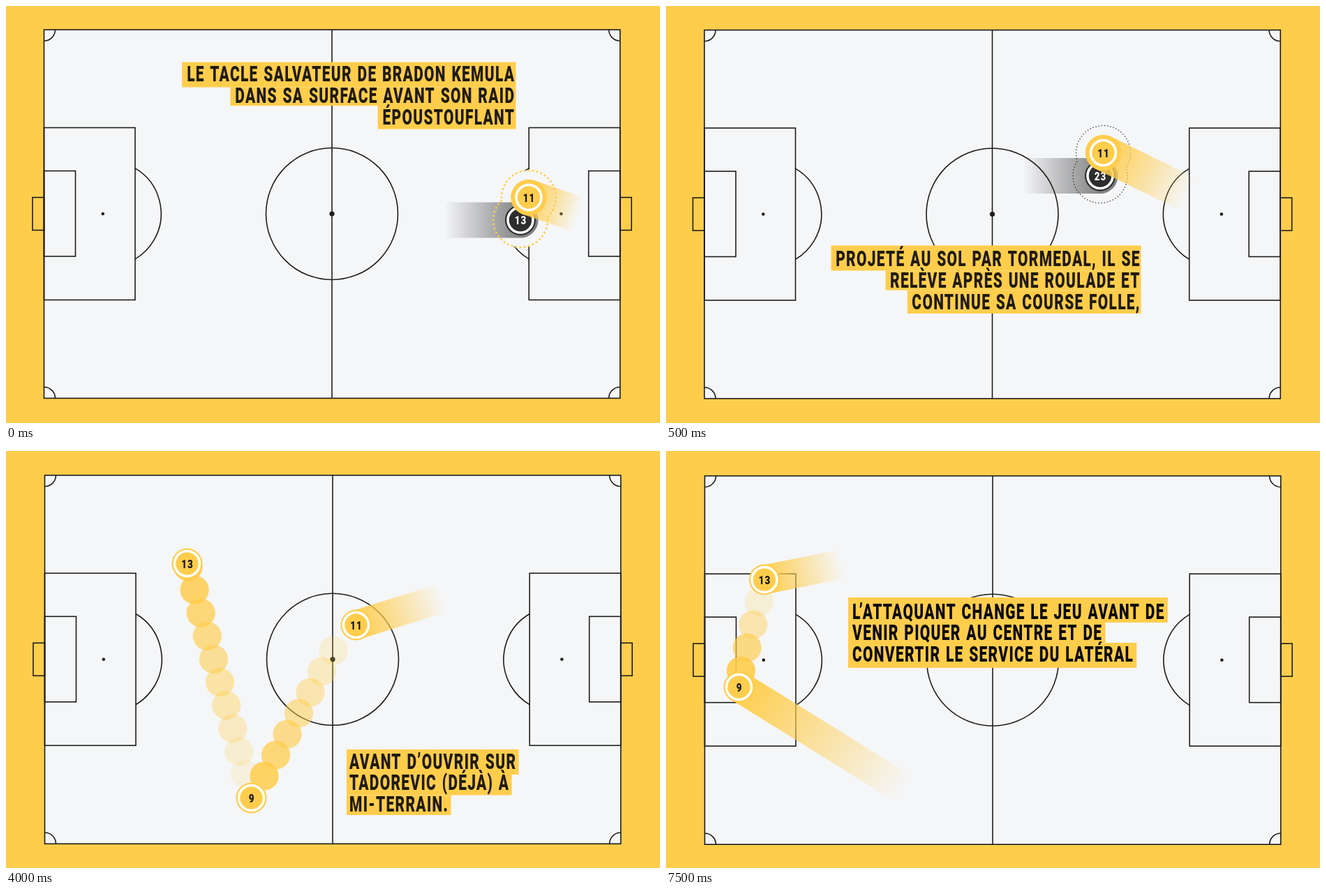
An HTML page with a canvas for the animation above (8000 ms loop, 937x598 px).

```html
<!DOCTYPE html>
<html lang="fr">
<head>
<meta charset="utf-8">
<title>Action de jeu</title>
<style>
  html, body { margin: 0; width: 100%; height: 100%; overflow: hidden; background: #ffcd4c; }
  canvas { display: block; width: 937px; height: 598px; }
</style>
</head>
<body>
<canvas id="stage"></canvas>
<script>
const W = 937, H = 598, LOOP = 8000;
const YELLOW = '#ffcd4c', PITCH = '#f5f6f8', INK = '#1d1d1b', DARK = '#2d2d2d';
const RGB = { yellow: '255,205,76', grey: '45,45,45' };
const TAU = Math.PI * 2;
const TRACKING = 2;

const canvas = document.getElementById('stage');
const ctx = canvas.getContext('2d');
const dpr = window.devicePixelRatio || 1;
canvas.width = W * dpr;
canvas.height = H * dpr;

const scenes = [
  {
    start: 0, shift: [0, 0],
    draw() {
      duel([749, 274.5], [820, 299], [737, 307], [628, 307], '13', YELLOW, 1.5, 6.2);
    },
    caption: {
      lines: ['LE TACLE SALVATEUR DE BRADON KEMULA', 'DANS SA SURFACE AVANT SON RAID', 'ÉPOUSTOUFLANT'],
      align: 'right', x: 728, pad: [7, 2.5], tops: [80.5, 116.5, 143, 176.5], base: 108, ink: '#201b0f'
    }
  },
  {
    start: 500, shift: [0.5, 0.5],
    draw() {
      duel([626.5, 210.5], [748, 270], [622, 243.5], [511, 243.5], '23', INK, 0.75, 4.2);
    },
    caption: {
      lines: ['PROJETÉ AU SOL PAR TORMEDAL, IL SE', 'RELÈVE APRÈS UNE ROULADE ET', 'CONTINUE SA COURSE FOLLE,'],
      align: 'right', x: 678.5, pad: [6.5, 2], tops: [343.5, 379.5, 407.5, 441], base: 373, ink: '#201b0f'
    }
  },
  {
    start: 4000, shift: [1, 0.8],
    draw() {
      passes([261, 166], [343, 464], 10, 0.92, 0.14);
      passes([370, 466], [469, 286], 7, 0.85, 0.2);
      trail([501.5, 249.5], [626, 210.5], 21, RGB.yellow, 1);
      token([259.5, 161.5], '13', 22);
      token([351.5, 497.5], '9', 22);
      token([501.5, 249.5], '11', 22);
    },
    caption: {
      lines: ['AVANT D’OUVRIR SUR', 'TADOREVIC (DÉJÀ) À', 'MI-TERRAIN.'],
      align: 'left', x: 492, pad: [4, 4.5], tops: [428, 464, 493.5, 522], base: 455.5, ink: '#201b0f'
    }
  },
  {
    start: 7500, shift: [1, 1.7],
    draw() {
      passes([107.5, 315], [133.5, 216], 4, 0.9, 0.2);
      trail([141, 184.5], [253, 162], 21, RGB.yellow, 1);
      trail([105, 338], [342.5, 485.5], 22, RGB.yellow, 1);
      token([141, 184.5], '13', 22);
      token([104.5, 338.5], '9', 22);
    },
    caption: {
      lines: ['L’ATTAQUANT CHANGE LE JEU AVANT DE', 'VENIR PIQUER AU CENTRE ET DE', 'CONVERTIR LE SERVICE DU LATÉRAL'],
      align: 'left', x: 267, pad: [6, 5.5], tops: [210, 246, 275, 311], base: 240.5, ink: '#0b0a07'
    }
  }
];

function setFont(size) {
  ctx.font = `900 condensed ${size}px Roboto, "Open Sans", sans-serif`;
  ctx.letterSpacing = TRACKING * size / 32 + 'px';
  ctx.wordSpacing = size / 20 + 'px';
}

// One condensing factor for all captions: mean advance of 13 px per capital.
function condensing() {
  setFont(32);
  const sample = scenes[3].caption.lines.join('');
  return 13 * sample.length / ctx.measureText(sample).width;
}
const narrow = condensing();
const digits = narrow * 1.2;

const textWidth = (s, squeeze) =>
  (ctx.measureText(s).width - parseFloat(ctx.letterSpacing)) * squeeze;

function write(s, x, y, color, squeeze) {
  ctx.save();
  ctx.translate(x, y);
  ctx.scale(squeeze, 1);
  ctx.fillStyle = color;
  ctx.fillText(s, 0, 0);
  ctx.restore();
}

function disc(x, y, r, color) {
  ctx.fillStyle = color;
  ctx.beginPath();
  ctx.arc(x, y, r, 0, TAU);
  ctx.fill();
}

function arc(x, y, r, from, to) {
  ctx.beginPath();
  ctx.arc(x, y, r, from, to);
  ctx.stroke();
}

function pitchHalf() {
  ctx.strokeRect(54.5, 174.5, 130.5, 247);
  ctx.strokeRect(54.5, 236.5, 45, 122.5);
  ctx.strokeRect(38, 274.5, 16.5, 47);
  disc(138.8, 298, 2.3, INK);
  const a = Math.acos(38.4 / 75.6);
  arc(146.6, 297.8, 75.6, -a, a);
  arc(54.5, 34, 16, 0, TAU / 4);
  arc(54.5, 562.5, 16, -TAU / 4, 0);
}

function pitch([dx, dy]) {
  ctx.save();
  ctx.translate(dx, dy);
  ctx.strokeStyle = INK;
  ctx.lineWidth = 1.6;
  ctx.fillStyle = PITCH;
  ctx.fillRect(54.5, 34, 825.3, 528.5);
  pitchHalf();
  ctx.save();
  ctx.translate(934.2, 0);
  ctx.scale(-1, 1);
  pitchHalf();
  ctx.restore();
  ctx.strokeRect(54.5, 34, 825.3, 528.5);
  ctx.beginPath();
  ctx.moveTo(467, 34);
  ctx.lineTo(467, 562.5);
  ctx.stroke();
  arc(467, 298, 94.5, 0, TAU);
  disc(467, 298, 3.6, INK);
  ctx.restore();
}

// Band with a round head at one end, fading out towards the tail.
function trail(head, tail, r, rgb, alpha) {
  const dx = tail[0] - head[0], dy = tail[1] - head[1];
  const length = Math.hypot(dx, dy);
  ctx.save();
  ctx.translate(...head);
  ctx.rotate(Math.atan2(dy, dx));
  const fade = ctx.createLinearGradient(0, 0, length, 0);
  fade.addColorStop(0, `rgba(${rgb},${alpha})`);
  fade.addColorStop(1, `rgba(${rgb},0)`);
  ctx.fillStyle = fade;
  ctx.beginPath();
  ctx.arc(0, 0, r, TAU / 4, TAU * 3 / 4);
  ctx.lineTo(length, -r);
  ctx.lineTo(length, r);
  ctx.fill();
  ctx.restore();
}

function token([x, y], label, r, fill = YELLOW, color = '#15130d') {
  disc(x, y, r, fill);
  ctx.strokeStyle = '#fff';
  ctx.lineWidth = 3.6;
  arc(x, y, 18, 0, TAU);
  setFont(17);
  write(label, x - textWidth(label, digits) / 2, y + 6, color, digits);
}

function passes(from, to, count, first, last) {
  for (let i = 0; i < count; i++) {
    const p = i / (count - 1);
    const x = from[0] + (to[0] - from[0]) * p;
    const y = from[1] + (to[1] - from[1]) * p;
    disc(x, y, 20.6, `rgba(${RGB.yellow},${first + (last - first) * p})`);
  }
}

// Dotted outline around two overlapping circles.
function dottedZone(a, b, r, color, size, gap) {
  const count = Math.round(TAU * r / gap);
  for (const [c, other] of [[a, b], [b, a]]) {
    for (let i = 0; i < count; i++) {
      const t = i / count * TAU;
      const x = c[0] + r * Math.cos(t), y = c[1] + r * Math.sin(t);
      if (Math.hypot(x - other[0], y - other[1]) > r) disc(x, y, size, color);
    }
  }
}

function duel(runner, runnerTail, rival, rivalTail, number, dotColor, dotSize, gap) {
  disc(...runner, 39, PITCH);
  disc(...rival, 39, PITCH);
  trail(rival, rivalTail, 25.6, RGB.grey, 0.58);
  dottedZone(runner, rival, 39, dotColor, dotSize, gap);
  token(rival, number, 22, DARK, '#fff');
  trail(runner, runnerTail, 25.6, RGB.yellow, 1);
  token(runner, '11', 25.6);
}

function caption({ lines, align, x, pad, tops, base, ink }) {
  setFont(32);
  const spans = lines.map(s => {
    const w = textWidth(s, narrow);
    return { left: align === 'right' ? x - w : x, w };
  });
  ctx.fillStyle = YELLOW;
  spans.forEach(({ left, w }, i) =>
    ctx.fillRect(left - pad[0], tops[i], w + pad[0] + pad[1], tops[i + 1] - tops[i]));
  lines.forEach((s, i) => write(s, spans[i].left, base + i * 30.8, ink, narrow));
}

const begin = performance.now();

function frame(now) {
  const t = Math.max(0, now - begin) % LOOP;
  const scene = scenes.filter(s => s.start <= t).pop();
  ctx.setTransform(dpr, 0, 0, dpr, 0, 0);
  ctx.fillStyle = YELLOW;
  ctx.fillRect(0, 0, W, H);
  pitch(scene.shift);
  scene.draw();
  caption(scene.caption);
  requestAnimationFrame(frame);
}

frame(begin);
</script>
</body>
</html>
```
